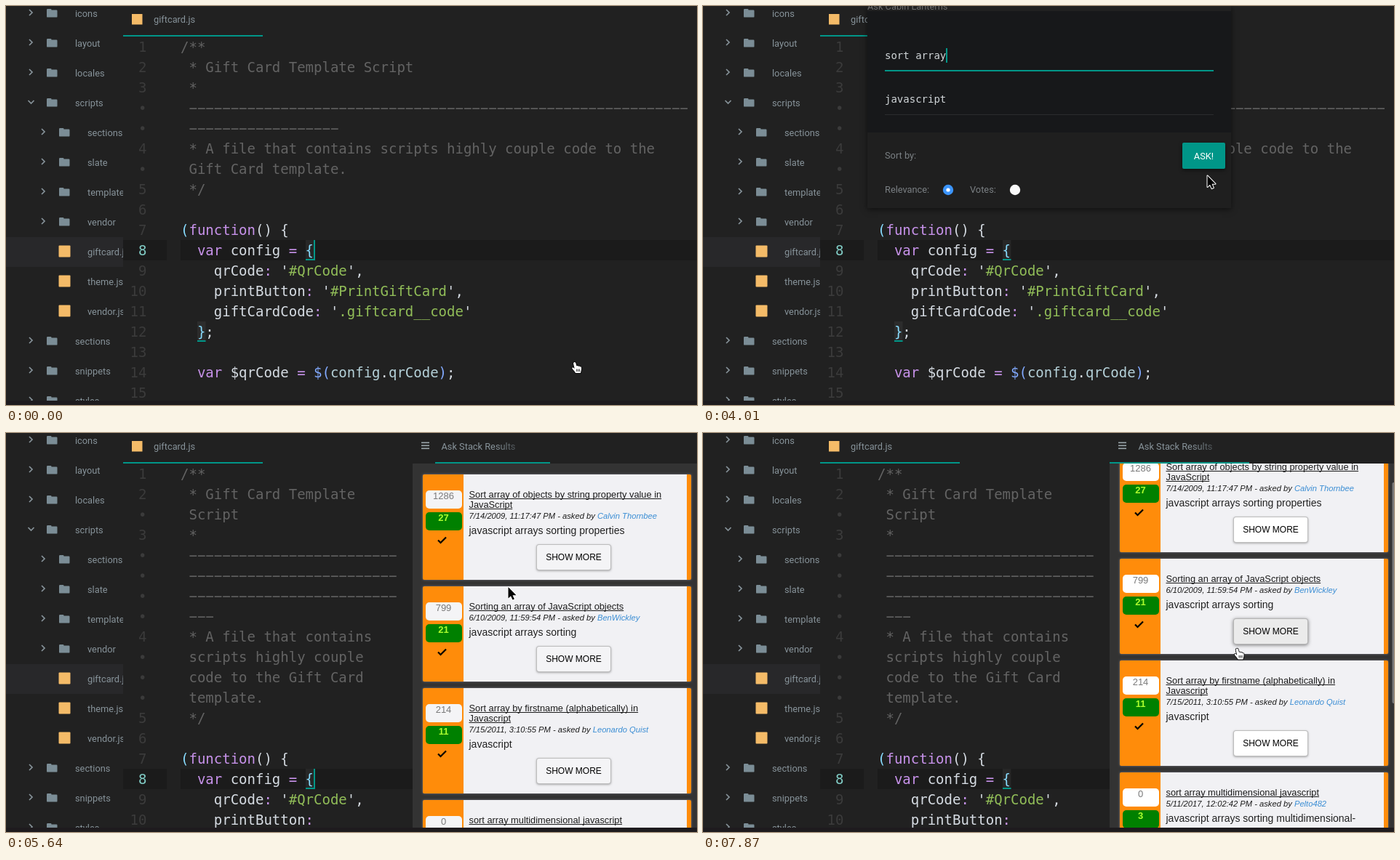
An HTML page with a canvas for the animation above (8 s loop, 950 by 549 pixels).

```html
<!DOCTYPE html>
<html lang="en">
<head>
<meta charset="utf-8">
<title>Editor search</title>
<style>
html, body { margin: 0; width: 100%; height: 100%; overflow: hidden; background: #212121; }
canvas { display: block; width: 950px; height: 549px; }
</style>
</head>
<body>
<canvas id="stage"></canvas>
<script>
const W = 950, H = 549, LOOP = 8000, TICK = 148;
const canvas = document.getElementById('stage');
const ctx = canvas.getContext('2d');
const dpr = window.devicePixelRatio || 1;
canvas.width = W * dpr;
canvas.height = H * dpr;

const MONO = '"DejaVu Sans Mono", monospace';
const UI = '12.8px Roboto, sans-serif';
const ARIAL = '"Liberation Sans", Arial, sans-serif';
const BG = '#212121', TEAL = '#009688', ORANGE = '#ff8c0a', LABEL = '#87939a';

const OPEN = 9, BLUR = 33, LOAD = 34, RESULTS = 38, HOVER = 47, SCROLL = 53;
const BLINKS = [1, 4, 7, OPEN, 12, 14, 17, 20, 22, 25, 28, 30, BLUR, RESULTS, 41, 43, 45, 49, 51];
const POINTER = [
  [0, 777.5, 489, 'hand'], [25, 764, 450, 'hand'], [26, 716, 312, 'arrow'],
  [27, 693.5, 233.5, 'arrow'], [28, 691, 219, 'arrow'], [29, 690.5, 212, 'arrow'],
  [45, 712, 167, 'arrow'], [46, 728, 250, 'arrow'], [HOVER, 730, 295.5, 'hand']
];

function rect(x, y, w, h, color) {
  ctx.fillStyle = color;
  ctx.fillRect(x, y, w, h);
}

function box(x, y, w, h, r, color) {
  ctx.fillStyle = color;
  ctx.beginPath();
  ctx.roundRect(x, y, w, h, r);
  ctx.fill();
}

function shadow(color, blur, dy) {
  ctx.shadowColor = color;
  ctx.shadowBlur = blur * dpr;
  ctx.shadowOffsetY = dy * dpr;
}

function text(str, x, y, font, color, align = 'left') {
  ctx.font = font;
  ctx.fillStyle = color;
  ctx.textAlign = align;
  ctx.fillText(str, x, y);
  return ctx.measureText(str).width;
}

function line(points, color, width) {
  ctx.strokeStyle = color;
  ctx.lineWidth = width;
  ctx.beginPath();
  points.forEach(([x, y]) => ctx.lineTo(x, y));
  ctx.stroke();
}

function disc(x, y, r, color) {
  ctx.fillStyle = color;
  ctx.beginPath();
  ctx.arc(x, y, r, 0, Math.PI * 2);
  ctx.fill();
}

function clipped(x, y, w, h, draw) {
  ctx.save();
  ctx.beginPath();
  ctx.rect(x, y, w, h);
  ctx.clip();
  draw();
  ctx.restore();
}

// ---- File tree: name, depth, kind ----
const TREE = [
  ['icons', 0], ['layout', 0], ['locales', 0], ['scripts', 0, 'open'],
  ['sections', 1], ['slate', 1], ['templates', 1], ['vendor', 1],
  ['giftcard.js', 1, 'file'], ['theme.js', 1, 'file'], ['vendor.js', 1, 'file'],
  ['sections', 0], ['snippets', 0], ['styles', 0]
];

function folder(x, y) {
  ctx.fillStyle = '#7b8d96';
  ctx.beginPath();
  ctx.roundRect(x, y, 6.5, 5, 1.2);
  ctx.roundRect(x, y + 1.6, 14.5, 10, 1.2);
  ctx.fill();
}

function tree() {
  clipped(0, 0, 161, 543, () => TREE.forEach(([name, depth, kind], i) => {
    const y = 10 + i * 41, x = depth * 17;
    if (name === 'giftcard.js') rect(0, 318, 161, 41, '#28282a');
    if (kind === 'file') {
      box(x + 55.5, y - 8.5, 16, 16, 1, '#f4bb68');
    } else {
      const cx = x + 34, cy = y - 1;
      line(kind ? [[cx - 3.5, cy - 2], [cx + .5, cy + 2], [cx + 4.5, cy - 2]]
                : [[cx - 2, cy - 4], [cx + 2, cy], [cx - 2, cy + 4]], LABEL, 1.7);
      folder(x + 56, y - 6);
    }
    text(name, x + 95, y + 5, UI, LABEL);
  }));
}

// ---- Code ----
const INK = { g: '#636363', p: '#c792ea', c: '#89ddff', w: '#d5dbe2', s: '#91bd58', b: '#82aaff', t: '#b4d0d8' };
const dashes = n => ' ' + '−'.repeat(n);
const comment = rows => rows.map(([num, str]) => [num, ['g', str]]);

const WIDE = comment([
  [1, '/**'], [2, ' * Gift Card Template Script'], [3, ' *'],
  ['•', dashes(60)], ['•', dashes(18)],
  [4, ' * A file that contains scripts highly couple code to the'],
  ['•', ' Gift Card template.'], [5, ' */']
]);
const NARROW = comment([
  [1, '/**'], [2, ' * Gift Card Template'], ['•', ' Script'], [3, ' *'],
  ['•', dashes(25)], ['•', dashes(25)], ['•', dashes(25)], ['•', dashes(3)],
  [4, ' * A file that contains'], ['•', ' scripts highly couple'],
  ['•', ' code to the Gift Card'], ['•', ' template.'], [5, ' */']
]);
const prop = (num, key, value, end) =>
  [num, ['w', '    ' + key], ['p', ': '], ['w', "'"], ['s', value], ['w', "'" + end]];
const CODE = [
  [6],
  [7, ['c', '('], ['p', 'function'], ['w', '() {']],
  [8, ['p', '  var '], ['w', 'config '], ['p', '= '], ['c', '{']],
  prop(9, 'qrCode', '#QrCode', ','),
  prop(10, 'printButton', '#PrintGiftCard', ','),
  prop(11, 'giftCardCode', '.giftcard__code', ''),
  [12, ['c', '  }'], ['w', ';']],
  [13],
  [14, ['p', '  var '], ['w', '$qrCode '], ['p', '= '], ['b', '$('], ['t', 'config'],
    ['w', '.'], ['t', 'qrCode'], ['b', ')'], ['w', ';']],
  [15]
];

function bracket(x, top) {
  rect(x, top, 11.5, 28, 'rgba(255,255,255,.05)');
  rect(x, top + 26, 11.5, 2, TEAL);
}

function editor(split, caretOn) {
  const right = split ? 559 : W;
  const font = '19px ' + MONO;
  const rows = [...(split ? NARROW : WIDE), ...CODE];
  const active = rows.findIndex(row => row[0] === 8);
  const top = 42 + active * 28;

  clipped(161, 0, right - 161, 543, () => {
    rect(173, 11, 14.5, 14.5, '#f4bb68');
    text('giftcard.js', 203, 23, UI, LABEL);
    rect(161, 40, 192, 2, TEAL);
    rect(161, top, 60, 28, '#1b1b1b');
    rect(240, top, right - 240, 28, '#1b1b1b');
    bracket(412, top);
    bracket(263, top + 112);

    rows.forEach(([num, ...parts], i) => {
      const y = 42 + i * 28 + 21;
      text(num, 193.5, y, font, num === 8 ? '#80cbc4' : '#3b3b3b', 'right');
      // The narrow pane wraps this row after the key
      if (split && num === 10) parts = parts.slice(0, 2);
      let x = 240;
      for (const [ink, str] of parts) x += text(str, x, y, font, INK[ink]);
    });
    if (caretOn) rect(423, top, 2, 28, TEAL);
  });
}

// ---- Search dialog ----
function spinner(x, y) {
  const n = 10, step = Math.PI * 2 / n;
  ctx.lineWidth = 4.5;
  for (let i = 0; i < n; i++) {
    const a = -Math.PI / 2 + i * step;
    const grey = i < 6 ? 240 : 240 - (i - 5) * 24;
    ctx.strokeStyle = `rgb(${grey},${grey},${grey})`;
    ctx.beginPath();
    ctx.arc(x, y, 22.6, a + .06, a + step - .06);
    ctx.stroke();
  }
  disc(x, y, 17, '#eeeeee');
}

function dialog(n, caretOn) {
  const loading = n >= LOAD;
  shadow('rgba(0,0,0,.55)', 8, 2);
  rect(226, 0, 500, 278, '#1f1f1f');
  shadow('transparent', 0, 0);
  rect(226, 0, 500, 7, BG);
  text('Ask Cabin Lanterns', 226, 5, UI, '#6c6c6c');
  rect(226, 7, 500, loading ? 230 : 167, '#17181a');

  const field = '14px ' + MONO;
  text('sort array', 250, 73, field, '#d0d5d8');
  text('javascript', 250, 133, field, '#d0d5d8');
  rect(250, 89, 452, 1, '#2b2c2e');
  rect(250, 149, 452, 1, '#2b2c2e');

  let focus = 0;
  if (n < BLUR) focus = 1 - .655 * .2 ** (n - OPEN);
  else if (n < LOAD) focus = .345;
  rect(476 - 226 * focus, 88, 452 * focus, 2, TEAL);
  if (caretOn) rect(334, 58, 2, 20, TEAL);

  text('Sort by:', 250, 210, UI, '#7b8084');
  text('Relevance:', 250, 257, UI, '#7b8084');
  text('Votes:', 367, 257, UI, '#7b8084');
  disc(337, 253, 7.2, '#3b94fb');
  disc(337, 253, 2.6, '#fff');
  disc(429, 253, 7.2, '#fafafa');

  if (loading) spinner(476, 191);
  shadow('rgba(0,0,0,.5)', 5, 2);
  box(659, 188, 59, 36, 2, TEAL);
  shadow('transparent', 0, 0);
  text('ASK!', 688.5, 211, UI, '#fff', 'center');
}

// ---- Results ----
const CARDS = [
  { votes: 1286, answers: 27, title: ['Sort array of objects by string property value in', 'JavaScript'],
    date: '7/14/2009, 11:17:47 PM', who: 'Calvin Thornbee', tags: 'javascript arrays sorting properties' },
  { votes: 799, answers: 21, title: ['Sorting an array of JavaScript objects'],
    date: '6/10/2009, 11:59:54 PM', who: 'BenWickley', tags: 'javascript arrays sorting' },
  { votes: 214, answers: 11, title: ['Sort array by firstname (alphabetically) in', 'Javascript'],
    date: '7/15/2011, 3:10:55 PM', who: 'Leonardo Quist', tags: 'javascript' },
  { votes: 0, answers: 3, title: ['sort array multidimensional javascript'],
    date: '5/11/2017, 12:02:42 PM', who: 'Pelto482', tags: 'javascript arrays sorting multidimensional-' }
];

function card(c, top, white, hover) {
  const extra = (c.title.length - 1) * 14, height = 131 + extra;
  shadow('rgba(170,170,185,.6)', 3, 0);
  box(573, top, 369, height, 2, ORANGE);
  shadow('transparent', 0, 0);
  rect(629, top, 307, height, '#f1f1f4');

  box(577, top + 22, 50, 25, 5, white);
  text(c.votes, 601.5, top + 33.5, '13px ' + ARIAL, '#7a7a7a', 'center');
  box(577, top + 52, 50, 25, 5, '#008000');
  text(c.answers, 601.5, top + 63.5, 'bold 13px ' + ARIAL, '#adff2f', 'center');
  line([[594, top + 90.5], [597.5, top + 94], [605, top + 86.5]], '#000', 2.2);

  c.title.forEach((str, i) => {
    const y = top + 32 + i * 14;
    const w = text(str, 636.5, y, '12.8px ' + ARIAL, '#1c1c1c');
    rect(636.5, y + 1, w, 1, '#1c1c1c');
  });
  const italic = 'italic 11.2px ' + ARIAL;
  const w = text(c.date + ' - asked by ', 636.5, top + 47 + extra, italic, '#1c1c1c');
  text(c.who, 636.5 + w, top + 47 + extra, italic, '#3a8dd4');
  text(c.tags, 636.5, top + 68 + extra, '14px ' + ARIAL, '#222');

  const by = top + 82 + extra;
  shadow(hover ? 'rgba(0,0,0,.5)' : 'rgba(0,0,0,.3)', hover ? 5 : 3, 1);
  box(729, by, 103, 36, 4, hover ? '#b4b4b4' : '#bdbdbd');
  shadow('transparent', 0, 0);
  box(730, by + 1, 101, 34, 3, hover ? '#ebebeb' : white);
  text('SHOW MORE', 780.5, by + 22, '12px ' + ARIAL, '#000', 'center');
  return height;
}

function results(n) {
  rect(559, 0, 391, 42, BG);
  for (let i = 0; i < 3; i++) rect(571, 12.5 + i * 4, 11, 1.6, '#9aa5aa');
  const fade = ctx.createLinearGradient(672, 0, 706, 0);
  fade.addColorStop(0, LABEL);
  fade.addColorStop(1, '#42474a');
  text('Ask Stack Results', 598.5, 23, UI, fade);

  rect(559, 42, 391, 501, '#333333');
  const scrolled = n >= SCROLL;
  clipped(559, 42, 391, 501, () => {
    let top = scrolled ? 19 : 57;
    CARDS.forEach((c, i) => {
      top += card(c, top, n < 45 ? '#f4f4f6' : '#fff', i === 1 && n >= HOVER) + 9;
    });
    if (scrolled) box(947.5, 68, 4, 304, 2, '#777');
  });
  if (n > RESULTS) rect(559, 40, 192, 2, TEAL);
  else rect(590, 40, 158, 2, TEAL);
}

// ---- Pointer ----
const SHAPES = {
  arrow: new Path2D('M0 0V15.5L3.5 12.2L6 17.6L8.4 16.6L6 11.2H11Z'),
  hand: new Path2D('M3.2 1.5C4.5 .6 5.6 1.4 6 3L7 6.5C8 5.6 9 6 9.4 7C10.2 6.2 11.3 6.6 11.6 7.6' +
    'C12.5 7 13.6 7.6 13.6 9C13.7 12 13 13 12.5 16H5.5C4.8 14 2 11.5 .8 9.8' +
    'C.4 8.6 1.8 8 3 9L4.2 10L2.6 3.2C2.4 2.4 2.6 1.8 3.2 1.5Z')
};

function pointer(n) {
  const [, x, y, kind] = POINTER.findLast(p => p[0] <= n);
  const arrow = kind === 'arrow';
  ctx.save();
  ctx.translate(x, y);
  ctx.lineJoin = 'round';
  ctx.lineWidth = arrow ? 2 : 1.6;
  ctx.strokeStyle = arrow ? '#fff' : '#000';
  ctx.fillStyle = arrow ? '#000' : '#fff';
  ctx.stroke(SHAPES[kind]);
  ctx.fill(SHAPES[kind]);
  if (!arrow) for (let i = 0; i < 3; i++) line([[7 + i * 2, 10.5], [7.2 + i * 2, 14]], '#000', .8);
  ctx.restore();
}

function draw(time) {
  const n = Math.min(53, Math.floor((time % LOOP) / TICK));
  const split = n >= RESULTS, asking = n >= OPEN && !split;
  const caretOn = BLINKS.filter(b => b <= n).length % 2 === 0;
  ctx.setTransform(dpr, 0, 0, dpr, 0, 0);
  rect(0, 0, W, H, BG);
  tree();
  editor(split, caretOn && !asking);
  if (asking) dialog(n, caretOn);
  if (split) results(n);
  rect(0, 543, W, 6, '#1e1b1e');
  pointer(n);
}

const start = performance.now();
function tick() {
  draw(performance.now() - start);
  requestAnimationFrame(tick);
}
tick();
</script>
</body>
</html>
```
